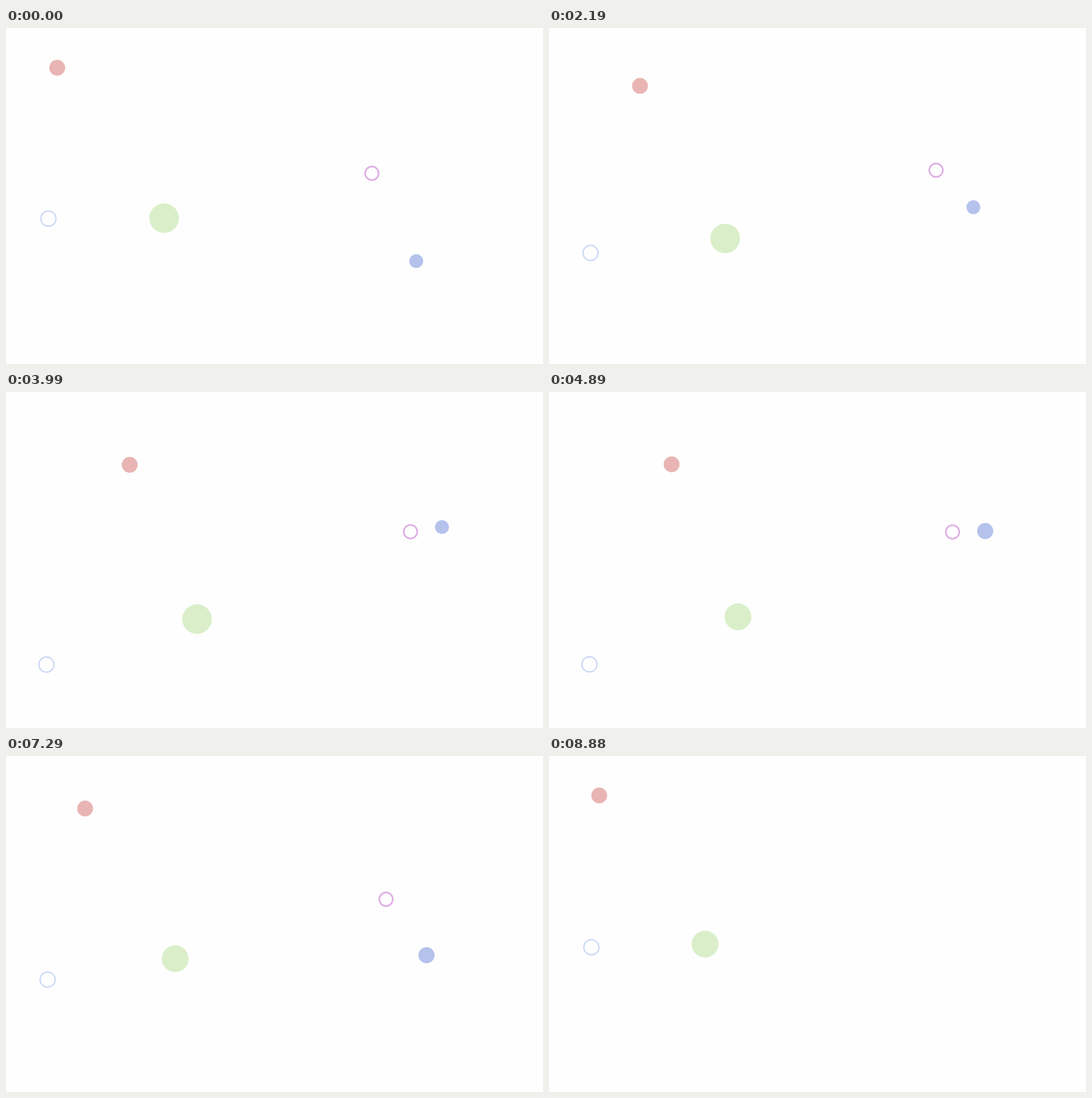
Write an HTML page that moves like this. It is 947x592 px and loops after 8910 ms.

```html
<!DOCTYPE html>
<html lang="en">
<head>
<meta charset="utf-8">
<title>Drifting circles</title>
<style>
  html, body { margin: 0; width: 100%; height: 100%; overflow: hidden; background: #fefefe; }
  svg { display: block; width: 100%; height: 100%; }
</style>
</head>
<body>
<svg id="stage" viewBox="0 0 947 592"></svg>
<script>
const LOOP = 8910, STEP = 30, TURN = 4410, HIDE = 8790;

// Each leg runs in a straight line from one [x, y] to another, in ms.
const leg = (start, end, from, to, r) => ({ start, end, from, to, r });

const circles = [
  { fill: '#e9b5b4', legs: [
    leg(0, TURN, [90.3, 70.1], [231.6, 134.4], 14),
    leg(TURN, LOOP, [231.6, 134.4], [87.6, 69.1], 14)] },
  { fill: '#daefc9', legs: [
    leg(0, TURN, [278.8, 335], [342.9, 407], 26.1),
    leg(TURN, LOOP, [340.2, 403.8], [274.8, 330.9], 23.7)] },
  { fill: '#b4c2ec', hide: HIDE, legs: [
    leg(0, TURN, [723.4, 410.6], [773.6, 219.7], 12.2),
    leg(TURN, HIDE, [774.8, 223.8], [724.2, 417.3], 14.2)] },
  { stroke: '#e0b0e6', width: 3, hide: HIDE, legs: [
    leg(0, TURN, [645.2, 256], [720.5, 245.1], 11.9),
    leg(TURN, HIDE, [719.9, 245.4], [644.3, 256.2], 11.9)] },
  { stroke: '#c9d6f5', width: 2.3, legs: [
    leg(900, 4350, [74.8, 336], [70.9, 497.1], 13.3),
    leg(TURN, LOOP, [70.9, 497], [74.8, 335.9], 13.3)] }
];

const stage = document.getElementById('stage');
for (const c of circles) {
  c.node = document.createElementNS('http://www.w3.org/2000/svg', 'circle');
  c.node.setAttribute('fill', c.fill || 'none');
  if (c.stroke) {
    c.node.setAttribute('stroke', c.stroke);
    c.node.setAttribute('stroke-width', c.width);
  }
  stage.appendChild(c.node);
}

function render(t) {
  for (const { node, legs, hide = LOOP } of circles) {
    const { start, end, from, to, r } = legs[t < TURN ? 0 : 1];
    const p = Math.min(1, Math.max(0, (t - start) / (end - start)));
    node.setAttribute('cx', from[0] + (to[0] - from[0]) * p);
    node.setAttribute('cy', from[1] + (to[1] - from[1]) * p);
    node.setAttribute('r', r);
    node.setAttribute('visibility', t < hide ? 'visible' : 'hidden');
  }
}

const origin = performance.now();
function tick() {
  const elapsed = (performance.now() - origin) % LOOP;
  render(Math.floor(elapsed / STEP) * STEP);
  requestAnimationFrame(tick);
}
tick();
</script>
</body>
</html>
```
